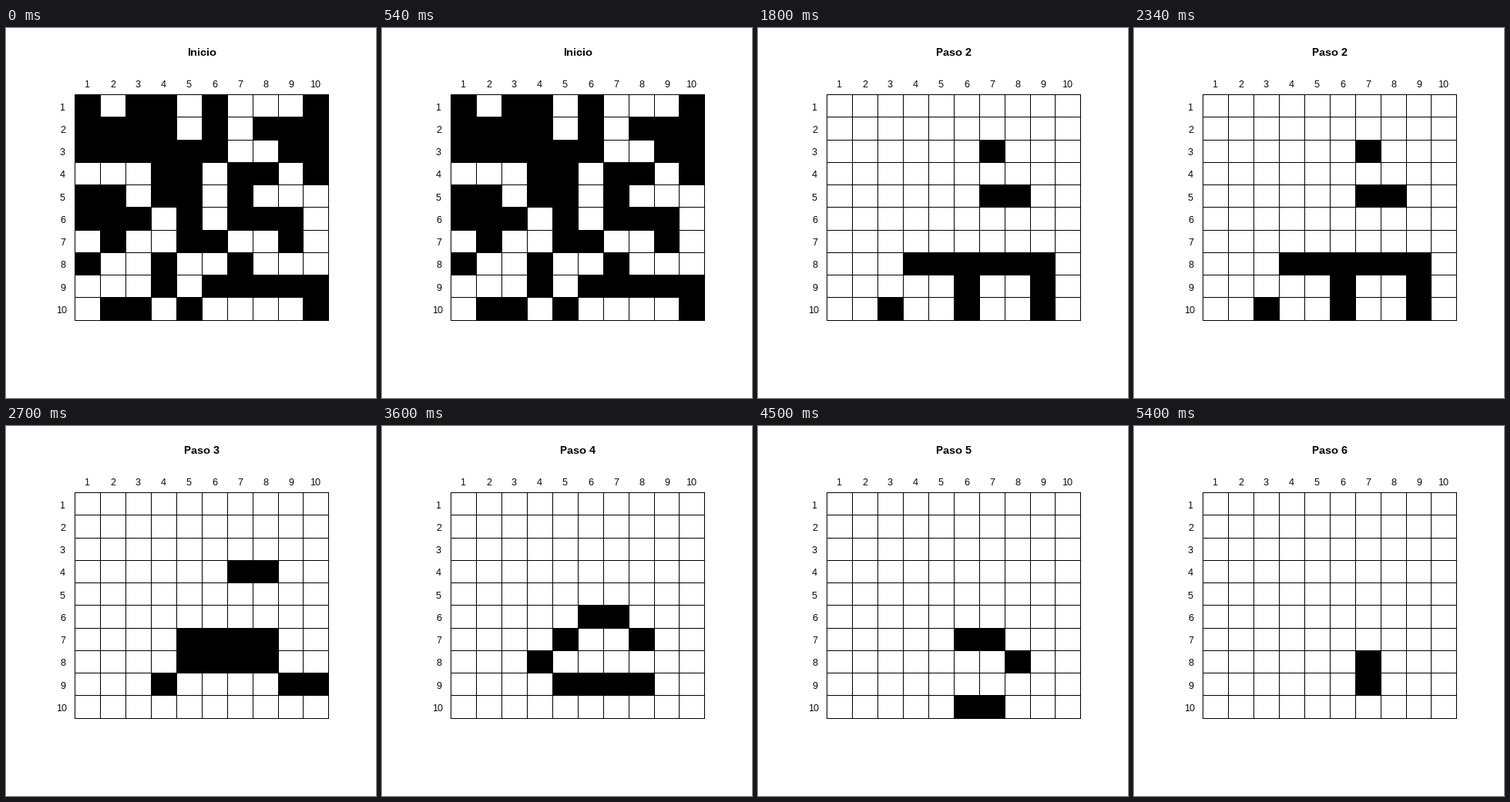
Write a matplotlib script that moves like this. It is 480x480 px and loops after 6300 ms.

```python
import numpy as np
import matplotlib.pyplot as plt
from matplotlib.animation import FuncAnimation
from matplotlib.patches import Rectangle

plt.rcParams.update({
    "font.family": "Liberation Sans",
    "text.hinting": "native",
    "text.hinting_factor": 1,
})

SIZE = 480
N = 10
STEPS = 7
DIGIT_W = 7  # advance of one label digit

START = """
1011010001
1111010111
1111110011
0001101101
1101101000
1110101110
0100110010
1001001000
0001011111
0110100001
""".split()

# Plot region inside the margins, spanning 0..11 with 4% padding on each side
LEFT, RIGHT, TOP, BOTTOM = 59.04, 449.76, 59.04, 406.56


def scale(lo, hi):
    unit = (hi - lo) / 1.08 / (N + 1)
    return lo + 0.04 * unit * (N + 1), unit


X0, DX = scale(LEFT, RIGHT)
Y0, DY = scale(TOP, BOTTOM)
xs = np.floor(X0 + DX * (np.arange(N + 1) + 0.5))
ys = np.floor(Y0 + DY * (np.arange(N + 1) + 0.5))


def evolve(grid):
    """A cell is alive only if exactly three neighbours are; edges are dead."""
    p = np.pad(grid, 1)
    total = sum(p[i:i + N, j:j + N] for i in range(3) for j in range(3))
    return (total - grid == 3).astype(int)


states = [np.array([[int(c) for c in row] for row in START])]
while len(states) < STEPS:
    states.append(evolve(states[-1]))

fig = plt.figure(figsize=(5, 5), dpi=96, facecolor="white")
ax = fig.add_axes([0, 0, 1, 1])

cells = ax.pcolormesh(xs, ys, states[0], cmap="gray_r", vmin=0, vmax=1,
                      antialiased=False, linewidth=0)


def bar(x, y, w, h):
    ax.add_patch(Rectangle((x, y), w, h, fc="black", lw=0, antialiased=False))


for x in xs:
    bar(x, ys[0], 1, ys[-1] - ys[0] + 1)
for y in ys:
    bar(xs[0], y, xs[-1] - xs[0] + 1, 1)


def label(text, col, row):
    x = np.floor(X0 + DX * col - DIGIT_W * len(text) / 2)
    y = np.floor(Y0 + DY * row + 5.85)
    ax.text(x, y, text, fontsize=9, va="baseline", ha="left")


for k in range(1, N + 1):
    label(str(k), k, 0)
    label(str(k), 0, k)

title = ax.text(235, 36, "Inicio", fontsize=10.5, weight="bold",
                va="baseline", ha="left")

ax.set_xlim(0, SIZE)
ax.set_ylim(SIZE, 0)
ax.axis("off")


def update(step):
    cells.set_array(states[step])
    title.set_text(f"Paso {step}" if step else "Inicio")
    title.set_x(231 if step else 235)
    return cells, title


anim = FuncAnimation(fig, update, frames=STEPS, interval=900,
                     repeat=True, repeat_delay=0, blit=False)
plt.show()
```
